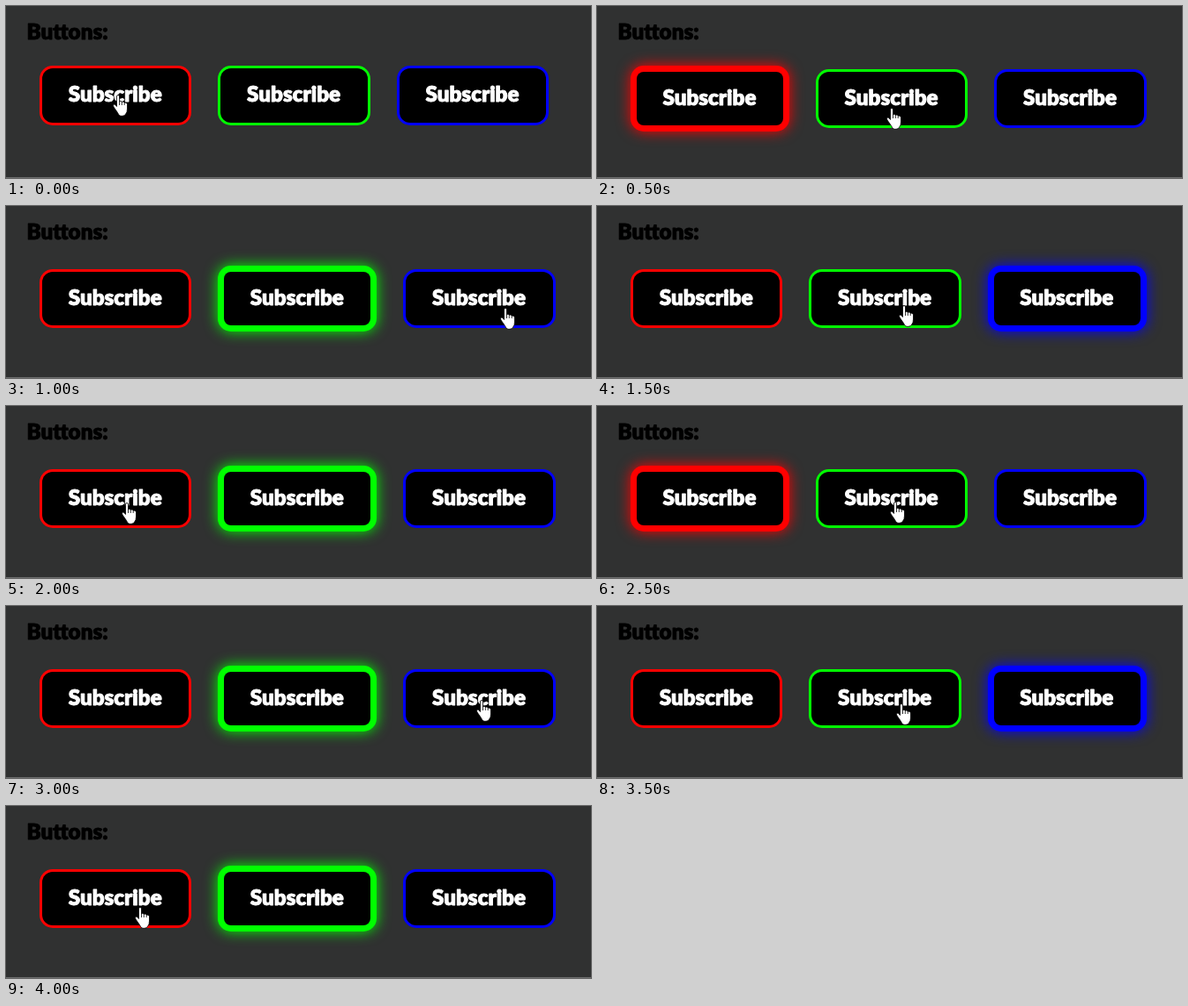
An HTML page with a canvas for the animation above (4.5 s loop, 663 by 196 pixels).

```html
<!DOCTYPE html>
<html lang="en">
<head>
<meta charset="utf-8">
<title>Buttons</title>
<style>
  html, body { margin: 0; width: 100%; height: 100%; overflow: hidden; background: #303131; }
  canvas { display: block; }
</style>
</head>
<body>
<canvas id="stage" width="663" height="196"></canvas>
<script>
const ctx = document.getElementById('stage').getContext('2d');
const STEP = 500;
const FONT = '900 24.2px Lato, "Open Sans", sans-serif';
const COLORS = ['#f00', '#0f0', '#00f'];
const LEFT = 38, TOP = 68, WIDTH = 172.4, HEIGHT = 67.5, GAP = 30;
const GROW = 7.5, RADIUS = 15, GLOW = 16;

// Each step: glowing button (-1 for none) and the pointer's top left corner.
const STEPS = [
  [-1, 121, 101],
  [0, 328, 116],
  [1, 560, 116],
  [2, 342, 113],
  [1, 131, 110],
  [0, 332, 109],
  [1, 533, 107],
  [2, 339, 111],
  [1, 146, 115]
];

const HAND = new Path2D('M4.5 2Q4.5 .5 6 .5T7.5 2V8Q7.7 7 9 7.2T10.3 8.7' +
  'Q10.7 7.8 12 8T13.2 9.6Q13.7 8.8 15 9.2T16.5 11V16Q16.5 20 14.7 22' +
  'Q13.5 24.3 11 24.3H9Q7 24.3 5.5 20.5L1 14Q0 12 1 11.2T3.3 12L4.5 13.5Z');
const CREASES = new Path2D('M7.5 8V12M10.3 8.7V12M13.2 9.6V12');

function fillRound(x, y, w, h, r, color) {
  ctx.fillStyle = color;
  ctx.beginPath();
  ctx.roundRect(x, y, w, h, r);
  ctx.fill();
}

// The thin outline gives the letters their extra weight.
function label(text, x, y, color, align) {
  ctx.font = FONT;
  ctx.textAlign = align;
  ctx.lineJoin = 'round';
  ctx.lineWidth = 0.9;
  ctx.fillStyle = ctx.strokeStyle = color;
  ctx.fillText(text, x, y);
  ctx.strokeText(text, x, y);
}

function drawButton(left, top, width, height, color, glows) {
  const x = Math.round(left), y = Math.round(top);
  const w = Math.round(left + width) - x;
  const h = Math.round(top + height) - y;
  const border = glows ? 7 : 3;
  ctx.save();
  if (glows) {
    ctx.shadowColor = color;
    ctx.shadowBlur = GLOW;
  }
  fillRound(x, y, w, h, RADIUS, color);
  ctx.restore();
  fillRound(x + border, y + border, w - 2 * border, h - 2 * border, RADIUS - border, '#000');
  label('Subscribe', left + width / 2 - 0.5, top + height / 2 + 7.4, '#fff', 'center');
}

function drawButtons(active) {
  let left = LEFT;
  COLORS.forEach((color, i) => {
    const glows = i === active;
    const grow = glows ? GROW : 0;
    const top = active < 0 || glows ? TOP : TOP + GROW / 2;
    drawButton(left, top, WIDTH + grow, HEIGHT + grow, color, glows);
    left += WIDTH + grow + GAP;
  });
}

function drawHand(x, y) {
  ctx.save();
  ctx.translate(x, y);
  ctx.fillStyle = '#fff';
  ctx.fill(HAND);
  ctx.strokeStyle = '#000';
  ctx.lineWidth = 0.8;
  ctx.stroke(HAND);
  ctx.stroke(CREASES);
  ctx.restore();
}

function draw(time) {
  const [active, x, y] = STEPS[Math.floor(time / STEP) % STEPS.length];
  ctx.fillStyle = '#303131';
  ctx.fillRect(0, 0, 663, 196);
  ctx.fillStyle = '#6c6d6d';
  ctx.fillRect(0, 195, 663, 1);
  label('Buttons:', 23.5, 38, '#000', 'left');
  drawButtons(active);
  drawHand(x, y);
}

const start = performance.now();
function tick() {
  draw(performance.now() - start);
  requestAnimationFrame(tick);
}
tick();
</script>
</body>
</html>
```
